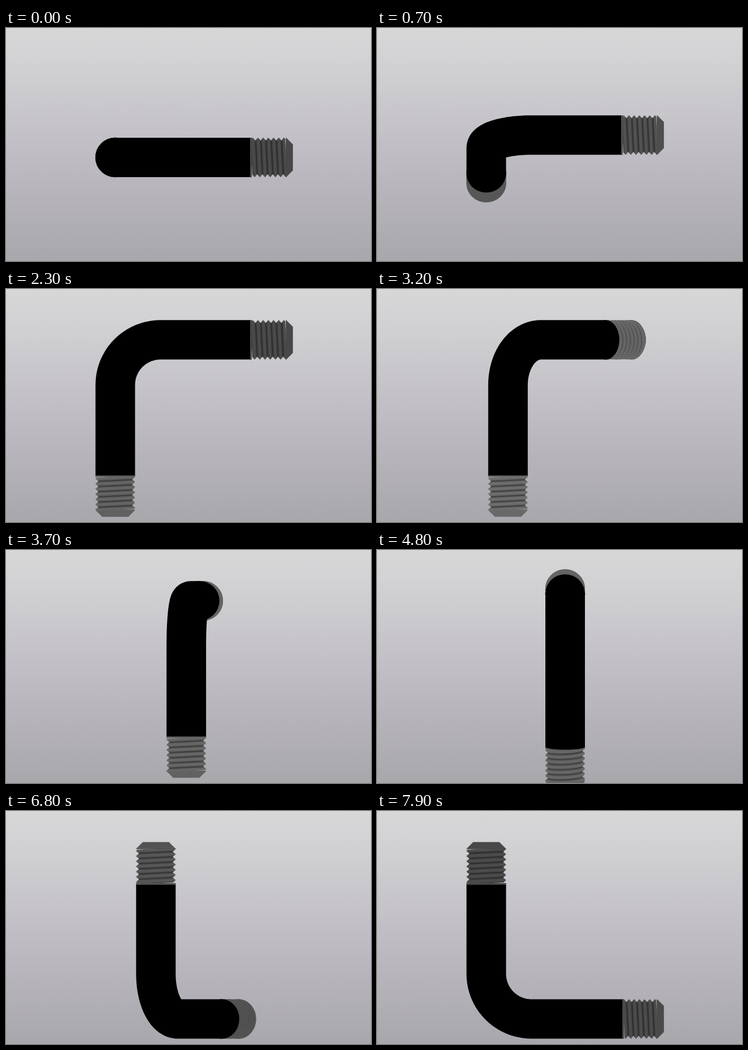
Animation of 646x414 px, one loop 8 s. Source, as an HTML page with a canvas:

```html
<!DOCTYPE html>
<html lang="en">
<head>
<meta charset="utf-8">
<title>Threaded elbow</title>
<style>
  html, body { margin: 0; width: 100%; height: 100%; overflow: hidden; background: #c0bfc4; }
  canvas { display: block; width: 646px; height: 414px; }
</style>
</head>
<body>
<canvas id="stage" width="646" height="414"></canvas>
<script>
const ctx = document.getElementById('stage').getContext('2d');
const LOOP = 8000, STEP = 100, TURN = 1400;
const CENTER = { x: 333, y: 229.9 };
const RADIUS = 35, AXIS = -139.6, TIP = 174.6, CUT_A = 99, CUT_B = 101.5, BEND = 80;
const PITCH = 9.2, DEPTH = 5.5, CHAMFER = 12, COLLAR = 2.5, HELIX = -0.05;

// Each turn gives the directions (right, down, away) of the two legs.
const turns = [
  { start: 317, pose: (s, c) => [[1, 0, 0], [0, s, c]] },
  { start: 2515, pose: (s, c) => [[c, 0, s], [0, 1, 0]] },
  { start: 4542, pose: (s, c) => [[0, -s, c], [0, c, s]] },
  { start: 6269, pose: (s, c) => [[0, -1, 0], [s, 0, c]] }
];

const clamp = x => Math.min(1, Math.max(0, x));
const smooth = x => x * x * (3 - 2 * x);

const sky = ctx.createLinearGradient(0, 0, 0, 414);
[[0, '#d8d7d8'], [0.2, '#cfced1'], [0.46, '#c3c1c7'], [0.72, '#b6b4ba'], [1, '#a8a7ac']]
  .forEach(([at, color]) => sky.addColorStop(at, color));

function poseAt(time) {
  const turn = turns.filter(t => t.start <= time).pop() || turns[0];
  const angle = smooth(clamp((time - turn.start) / TURN)) * Math.PI / 2;
  const [a, b] = turn.pose(Math.sin(angle), Math.cos(angle));
  return { a, b, swirl: Math.sin(2 * angle) };
}

function projector({ a, b }) {
  return (u, v) => [
    CENTER.x + u * a[0] + v * b[0],
    CENTER.y + u * a[1] + v * b[1]
  ];
}

function disc([x, y], dir, radius, tilt = 0) {
  const turn = Math.atan2(dir[1], dir[0]) + tilt;
  ctx.beginPath();
  ctx.ellipse(x, y, radius * Math.abs(dir[2]), radius, turn, 0, 2 * Math.PI);
  ctx.fill();
}

// Thin slices from the far tip towards the body.
function drawThread(dir, cut, place, shade) {
  ctx.lineWidth = 1.3;
  for (let s = TIP - 0.5; s >= cut; s -= 0.75) {
    const fromTip = TIP - s;
    let radius = RADIUS, tone = shade, tilt = 0;
    if (fromTip < CHAMFER) {
      radius -= CHAMFER - fromTip;
    } else if (s > cut + COLLAR) {
      const phase = ((fromTip - CHAMFER - 2) / PITCH + 1) % 1;
      const groove = 1 - Math.abs(2 * phase - 1);
      radius -= DEPTH * groove;
      tone *= 1.06 - 0.55 * groove ** 2.5;
      tilt = HELIX;
    }
    const gray = Math.round(tone);
    ctx.fillStyle = ctx.strokeStyle = `rgb(${gray},${gray},${gray})`;
    disc(place(s), dir, radius - 0.4, tilt);
    ctx.stroke();
  }
}

function drawBody({ a, b }, at) {
  ctx.fillStyle = ctx.strokeStyle = '#000';
  ctx.lineWidth = 2 * RADIUS;
  ctx.lineJoin = 'round';
  ctx.beginPath();
  ctx.moveTo(...at(CUT_A, AXIS));
  const mid = AXIS + BEND;
  for (let i = 0; i <= 20; i++) {
    const angle = i / 20 * Math.PI / 2;
    ctx.lineTo(...at(mid - BEND * Math.sin(angle), mid - BEND * Math.cos(angle)));
  }
  ctx.lineTo(...at(AXIS, CUT_B));
  ctx.stroke();
  disc(at(CUT_A, AXIS), a, RADIUS);
  disc(at(AXIS, CUT_B), b, RADIUS);
}

function draw(time) {
  const pose = poseAt(time), at = projector(pose);
  const { a, b, swirl } = pose;
  ctx.fillStyle = sky;
  ctx.fillRect(0, 0, 646, 414);
  drawThread(b, CUT_B, s => at(AXIS, s), 72 + 24 * b[1] + 8 * swirl);
  drawThread(a, CUT_A, s => at(s, AXIS), 70 + 22 * a[2] + 13 * swirl);
  drawBody(pose, at);
}

const origin = performance.now();
function tick() {
  const time = (performance.now() - origin) % LOOP;
  draw(Math.floor(time / STEP) * STEP);
  requestAnimationFrame(tick);
}
tick();
</script>
</body>
</html>
```
